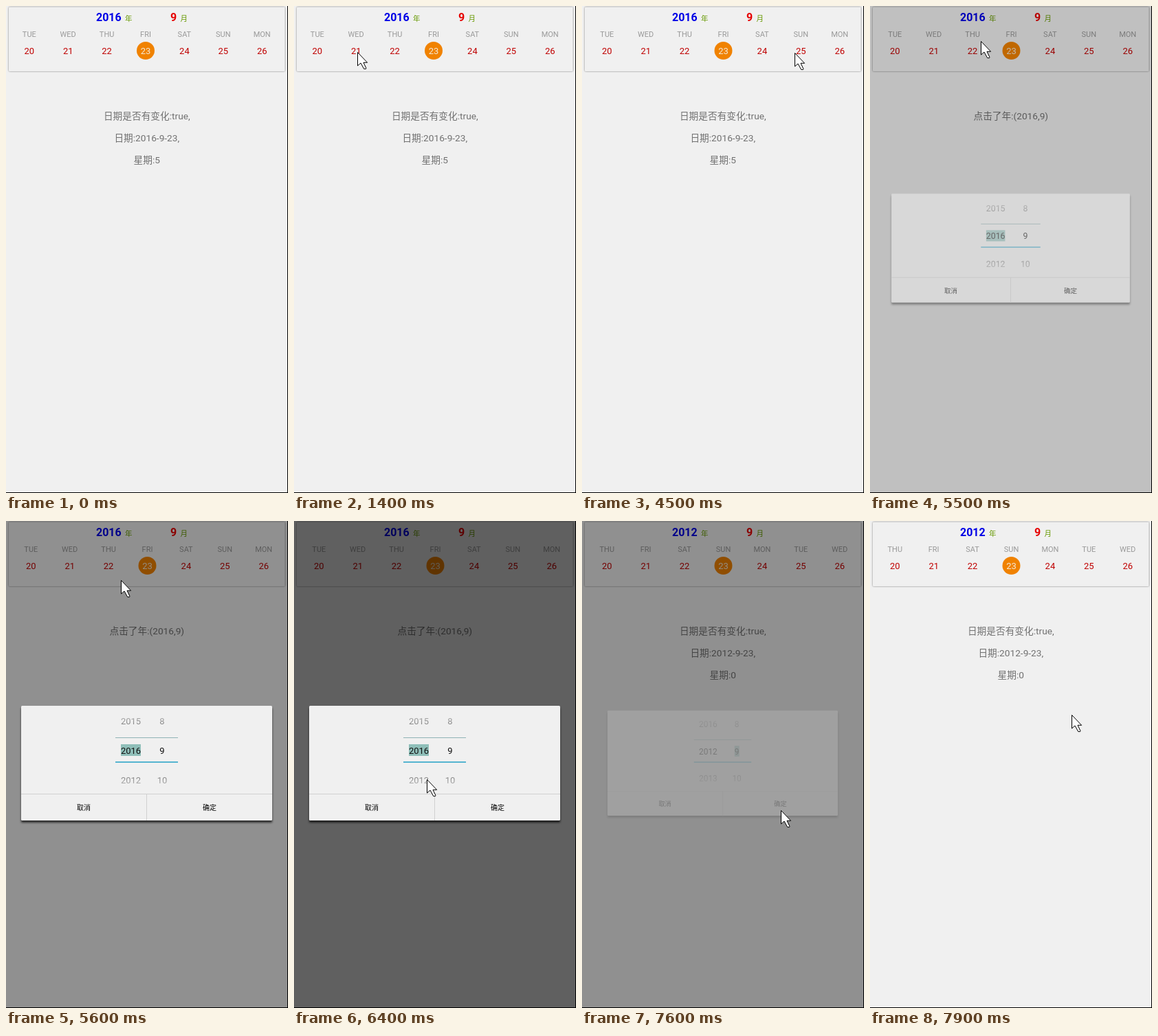
An HTML page that plays this animation: 410 by 709 pixels, repeating every 8 s.

```html
<!DOCTYPE html>
<html lang="zh">
<head>
<meta charset="utf-8">
<title>Week calendar</title>
<style>
  html, body { margin: 0; width: 100%; height: 100%; overflow: hidden; background: #000; }
  svg { display: block; width: 410px; height: 709px; font-family: Roboto, "Noto Sans CJK SC", "Noto Sans CJK", sans-serif; }
  .mid { text-anchor: middle; }
  .head { font-size: 16px; font-weight: 700; }
  .unit { font-size: 10.5px; fill: #669900; }
  .label { font-size: 11px; fill: #999; }
  .day { font-size: 13px; fill: #c00000; }
  .day.on { fill: #f4ead8; }
  .info { font-size: 13.7px; fill: #717171; }
  .pick { font-size: 13px; fill: #111; }
  .button { font-size: 10px; fill: #000; }
  .card { filter: drop-shadow(0 .5px 1px rgba(0, 0, 0, .5)); }
  .panel { filter: drop-shadow(0 3px 1.5px rgba(0, 0, 0, .7)); }
</style>
</head>
<body>
<svg viewBox="0 0 410 709">
  <defs>
    <linearGradient id="fade" x2="0" y2="1">
      <stop offset="0" stop-color="#fff" stop-opacity="0"/>
      <stop offset=".44" stop-color="#fff"/>
      <stop offset=".56" stop-color="#fff"/>
      <stop offset="1" stop-color="#fff" stop-opacity="0"/>
    </linearGradient>
    <mask id="wheel" maskUnits="userSpaceOnUse" x="150" y="268" width="110" height="132">
      <rect x="150" y="268" width="110" height="132" fill="url(#fade)"/>
    </mask>
  </defs>

  <rect width="409" height="708" fill="#f0f0f0"/>
  <rect class="card" x="4" y="1.5" width="401.5" height="93.5" rx="1.5" fill="#f0f0f0"/>
  <text id="year" class="head" x="131" y="22" fill="#0000e6"></text>
  <text class="unit" x="173" y="22">年</text>
  <text class="head" x="239" y="22" fill="#e60000">9</text>
  <text class="unit" x="253.5" y="22">月</text>
  <g id="week"><circle cx="203" cy="65" r="13" fill="#f08200"/></g>
  <g id="info"></g>

  <rect id="dim" width="409" height="708"/>

  <g id="dialog">
    <rect class="panel" x="22" y="269" width="365" height="167" rx="1.5" fill="#f0f0f0"/>
    <path d="M22 397.5H387M204.5 397.5V436" stroke="#d0d0d0" fill="none"/>
    <rect id="yearMark" x="167" y="325" width="29" height="17" fill="#8fbfb9"/>
    <rect id="monthMark" x="223.3" y="325" width="7.6" height="17" fill="#8fbfb9"/>
    <g mask="url(#wheel)"><g id="years"></g><g id="months"></g></g>
    <path d="M159 315.5H250" stroke="#8fb3b5"/>
    <path d="M159 351H250" stroke="#55b4d0" stroke-width="2"/>
    <text class="button mid" x="113" y="421">取消</text>
    <text class="button mid" x="296" y="421">确定</text>
  </g>

  <path id="cursor" d="M.5 .5V20L5 16L9.7 24.6H12.6L12.9 23.4L9 15.3H14.6Z" fill="#fff" stroke="#000" stroke-linejoin="round"/>
</svg>
<script>
const LOOP = 8000, STEP = 100;
const COLUMN = 56.4, LINE = 32, ROW = 43;
const OPEN = 5400, PICK = 6400, CLOSE = 7500;
const WEEKDAYS = ['SUN', 'MON', 'TUE', 'WED', 'THU', 'FRI', 'SAT'];
const $ = id => document.getElementById(id);

// Places the pointer reaches: [arrival time, x, y]
const STOPS = [
  [300, 114, 55], [500, 124, 57], [900, 154, 77], [1150, 79, 70], [1400, 92, 67],
  [2100, 110, 71], [2700, 272, 141], [3100, 205, 71], [4200, 300, 68], [4500, 309, 68],
  [5300, 156, 16], [5600, 167, 86], [6200, 193, 376], [7000, 261, 402],
  [7400, 289, 421], [7900, 293, 282]
];

const ramp = (t, from, to) => Math.min(1, Math.max(0, (t - from) / (to - from)));
const smooth = k => k * k * (3 - 2 * k);

// Longer moves take longer, and each one starts just in time to arrive.
function pointerAt(t) {
  let [last, x, y] = STOPS[0];
  for (const [arrival, nextX, nextY] of STOPS.slice(1)) {
    const dx = nextX - x, dy = nextY - y;
    const begin = Math.max(last, arrival - 100 - 1.4 * Math.hypot(dx, dy));
    const k = smooth(ramp(t, begin, arrival));
    x += dx * k;
    y += dy * k;
    if (k < 1) break;
    last = arrival;
  }
  return [Math.round(x), Math.round(y)];
}

function addText(parent, cls, x, y, content = '') {
  const el = document.createElementNS('http://www.w3.org/2000/svg', 'text');
  el.setAttribute('class', cls + ' mid');
  el.setAttribute('x', x);
  el.setAttribute('y', y);
  el.textContent = content;
  return parent.appendChild(el);
}

const columns = WEEKDAYS.map((_, i) => {
  const x = 203 + COLUMN * (i - 3);
  return {
    label: addText($('week'), 'label', x, 45),
    day: addText($('week'), i === 3 ? 'day on' : 'day', x, 70)
  };
});
const lines = Array.from({ length: 3 }, (_, i) => addText($('info'), 'info', 204.8, 165.4 + LINE * i));
const addWheel = (id, x, values) =>
  values.forEach((v, i) => addText($(id), 'pick', x, 295.7 + ROW * i, v));
addWheel('years', 181.5, [2015, 2016, 2012, 2013]);
addWheel('months', 227, [8, 9, 10]);

function setText(el, value) {
  if (el.textContent !== String(value)) el.textContent = value;
}

function drawCalendar(t) {
  const year = t > CLOSE ? 2012 : 2016;
  const day = t >= 1700 && t < 4100 ? 21 : 23;
  const weekday = new Date(year, 8, day).getDay();
  setText($('year'), year);
  columns.forEach((c, i) => {
    setText(c.label, WEEKDAYS[(weekday + i + 4) % 7]);
    setText(c.day, day + i - 3);
  });
  const drag = 10.5 * ramp(t, 4300, 4500) - 8 * ramp(t, 4000, 4200);
  $('week').setAttribute('transform', `translate(${drag})`);

  const message = t >= OPEN && t <= CLOSE
    ? ['点击了年:(2016,9)', '', '']
    : ['日期是否有变化:true,', `日期:${year}-9-${day},`, `星期:${weekday}`];
  lines.forEach((el, i) => setText(el, message[i]));
}

function drawDialog(t) {
  $('dim').setAttribute('opacity', .6 * (ramp(t, OPEN, OPEN + 300) - ramp(t, CLOSE, CLOSE + 300)));
  const shown = ramp(t, OPEN, OPEN + 200) - ramp(t, CLOSE, CLOSE + 121);
  $('dialog').setAttribute('opacity', shown);
  $('dialog').setAttribute('transform',
    `translate(204.5 352.5) scale(${.9 + .1 * shown}) translate(-204.5 -352.5)`);

  const scroll = 1 - (1 - ramp(t, PICK, PICK + 400)) ** 2.5;
  $('years').setAttribute('transform', `translate(0 ${-ROW * scroll})`);
  $('yearMark').setAttribute('opacity', t > PICK ? 0 : 1);
  $('monthMark').setAttribute('opacity', t > PICK ? 1 : 0);
}

function drawPointer(t) {
  $('cursor').setAttribute('transform', `translate(${pointerAt(t)})`);
  $('cursor').setAttribute('opacity', t < STOPS[0][0] ? 0 : 1);
}

const start = performance.now();
function frame() {
  const elapsed = (performance.now() - start) % LOOP;
  const t = Math.floor(elapsed / STEP) * STEP;
  drawCalendar(t);
  drawDialog(t);
  drawPointer(t);
  requestAnimationFrame(frame);
}
frame();
</script>
</body>
</html>
```
